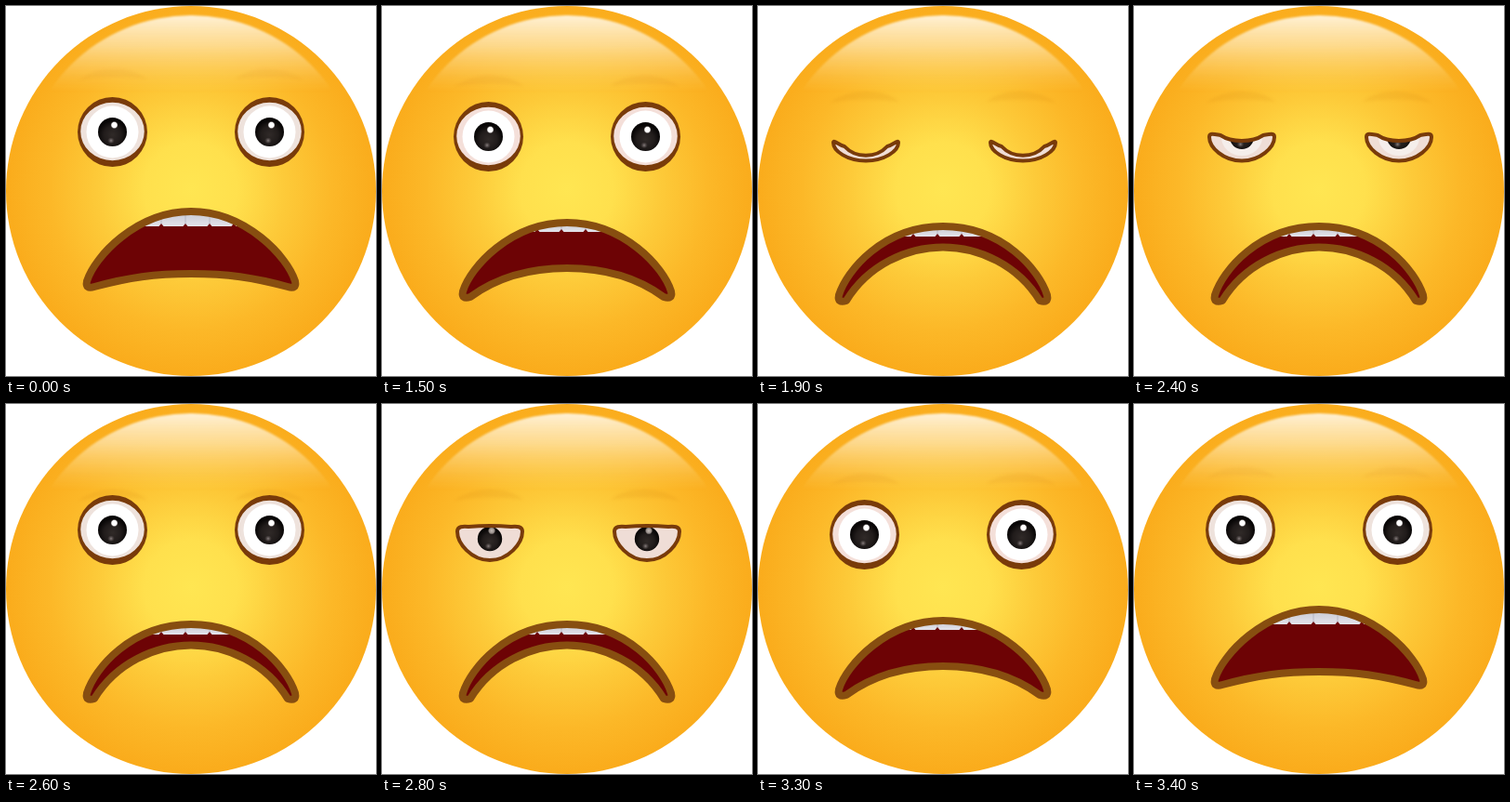
An HTML page with a canvas that plays this animation: 398x398 px, repeating every 3.5 s.

```html
<!DOCTYPE html>
<html lang="en">
<head>
<meta charset="utf-8">
<title>Weary face</title>
<style>
html, body { margin: 0; width: 100%; height: 100%; overflow: hidden; background: #fff; }
canvas { display: block; width: 398px; height: 398px; }
</style>
</head>
<body>
<canvas id="stage" width="398" height="398"></canvas>
<script>
const g = document.getElementById('stage').getContext('2d');
const LOOP = 3500;

// Round eyes have a centre; lidded eyes have corner k, lift h, shoulder u, lid m, side l, bottom b.
const EYES = {
  open: { y: 135.5, ring: '#eee2dc', pupil: 15.5 },
  low: { y: 140.5, ring: '#f4dfd9', pupil: 15.5 },
  drop: { k: 143, h: 13, u: 121, m: 117, l: 162, b: 174, py: 143, pupil: 14.5 },
  half: { k: 137, h: 5, u: 132, m: 131, l: 150, b: 168, py: 145, pupil: 13.2 },
  narrow: { k: 141, h: 5, u: 139, m: 147, l: 152, b: 166.5, py: 141, pupil: 13 },
  shut: { k: 147, h: 4, u: 151, m: 164, l: 156, b: 166.5, py: 141, pupil: 13 }
};

// Mouth: top, corner, bottom, upper and lower lip handles, teeth edge, brow offset and strength.
const MOUTHS = [
  { top: 221, corner: 296, low: 288, ux: 140, hx: 132, hy: 292, teeth: 237, brow: 0, ink: .06 },
  { top: 233, corner: 307, low: 282, ux: 138, hx: 125, hy: 291, teeth: 243, brow: 7, ink: .08 },
  { top: 236, corner: 310, low: 268, ux: 136, hx: 121, hy: 283, teeth: 247, brow: 17, ink: .09 },
  { top: 237, corner: 311, low: 259.5, ux: 134, hx: 118, hy: 279, teeth: 248, brow: 24, ink: .1 }
];

const POSES = [
  [0, 'open', 0], [1500, 'low', 1], [1600, 'drop', 2], [1700, 'half', 3],
  [1800, 'narrow', 3], [1900, 'shut', 3], [2400, 'narrow', 3], [2500, 'half', 3],
  [2600, 'open', 3], [2800, 'half', 3], [2900, 'narrow', 3], [3100, 'half', 3],
  [3200, 'drop', 2], [3300, 'low', 1], [3400, 'open', 0]
];

function radial(x, y, r, stops) {
  const paint = g.createRadialGradient(x, y, 0, x, y, r);
  stops.forEach(([at, color]) => paint.addColorStop(at, color));
  return paint;
}

function oval(x, y, rx, ry, fill) {
  g.beginPath();
  g.ellipse(x, y, rx, ry, 0, 0, Math.PI * 2);
  g.fillStyle = fill;
  g.fill();
}

function outline(path, color, width) {
  g.strokeStyle = color;
  g.lineWidth = width;
  g.lineJoin = g.lineCap = 'round';
  g.stroke(path);
}

function drawFace() {
  oval(199, 199, 199, 199, radial(199, 197, 202, [
    [0, '#ffe652'], [.25, '#ffe04d'], [.5, '#fdca39'], [.75, '#fcb828'], [1, '#faab1b']
  ]));
  const shine = g.createLinearGradient(0, 10, 0, 92);
  shine.addColorStop(0, 'rgba(255,250,238,.88)');
  shine.addColorStop(.4, 'rgba(255,244,215,.58)');
  shine.addColorStop(.8, 'rgba(255,238,180,.16)');
  shine.addColorStop(1, 'rgba(255,235,160,0)');
  g.filter = 'blur(1.2px)';
  oval(199, 193, 183, 183, shine);
  g.filter = 'none';
}

function drawBrows({ brow, ink }) {
  g.filter = 'blur(1.5px)';
  for (const side of [-1, 1]) {
    g.save();
    g.translate(199 + side * 84, 73 + brow);
    g.scale(side, 1);
    g.fillStyle = `rgba(190,105,0,${ink})`;
    g.fill(new Path2D('M-37,6 C-18,-9 16,-9 37,7 C14,2 -18,3 -37,6Z'));
    g.restore();
  }
  g.filter = 'none';
}

function drawPupil(y, r, bright) {
  const glint = y - r * (bright ? .48 : .66);
  oval(0, y, r, r, radial(0, y + r * .2, r, [[0, '#302a28'], [.6, '#211c1b'], [1, '#080606']]));
  oval(-1.5, y + r * .6, 4, 3, radial(-1.5, y + r * .6, 4, [
    [0, 'rgba(170,160,160,.75)'], [1, 'rgba(90,80,80,0)']
  ]));
  oval(2, glint, 4, 4.2, radial(2, glint, 4.2, [
    [0, bright ? '#fff' : '#c4bcb8'], [.65, bright ? '#fff' : '#948b87'], [1, 'rgba(150,140,140,0)']
  ]));
}

function drawEye(x, eye) {
  g.save();
  if (eye.y) {
    g.translate(x, eye.y);
    oval(0, 0, 37.5, 37.5, '#793b0a');
    oval(0, -.5, 34.3, 31.2, eye.ring);
    oval(0, 0, 28, 28, '#fff');
    drawPupil(0, eye.pupil, true);
  } else {
    const { k, h, u, m, l, b } = eye;
    g.translate(x + 1.5, 0);
    const shape = new Path2D(`M-35,${k} C-35,${k - h} -29,${u - 1} -23,${u}
      C-11,${m} 11,${m} 23,${u} C29,${u - 1} 35,${k - h} 35,${k}
      C35,${l} 20,${b} 0,${b} S-35,${l} -35,${k}Z`);
    g.save();
    g.clip(shape);
    g.fillStyle = '#efddd6';
    g.fillRect(-40, 90, 80, 90);
    if (eye === EYES.narrow) oval(0, 141, 22, 20, '#f5eeeb');
    drawPupil(eye.py, eye.pupil, eye === EYES.drop);
    g.restore();
    outline(shape, '#793b0a', 4);
  }
  g.restore();
}

function drawMouth({ top, corner, low, ux, hx, hy, teeth }) {
  const shape = new Path2D(`M87,${corner} C95,${corner - 26} ${ux},${top} 199,${top}
    S303,${corner - 26} 311,${corner} Q313,${corner + 9} 303,${corner + 6}
    C${398 - hx},${hy} 238,${low} 199,${low} S${hx},${hy} 95,${corner + 6}
    Q85,${corner + 9} 87,${corner}Z`.replace('S303', `C${398 - ux},${top} 303`));
  g.save();
  g.clip(shape);
  g.fillStyle = '#6d0305';
  g.fillRect(80, 210, 240, 120);
  const enamel = g.createLinearGradient(0, top, 0, teeth);
  enamel.addColorStop(0, '#c5c5ce');
  enamel.addColorStop(1, '#e4e4ec');
  g.fillStyle = enamel;
  g.fillRect(141, top, 116, teeth - top);
  for (let x = 167; x <= 245; x += 26) {
    g.fillStyle = 'rgba(140,140,160,.4)';
    g.fillRect(x - .5, top, 1, teeth - top);
    g.fillStyle = '#6d0305';
    g.fill(new Path2D(`M${x - 2.5},${teeth} L${x},${teeth - 3} L${x + 2.5},${teeth}Z`));
  }
  g.restore();
  outline(shape, '#874e10', 8);
}

function draw(now) {
  const time = now % LOOP;
  const [, eye, mouth] = POSES.findLast(([start]) => start <= time);
  g.clearRect(0, 0, 398, 398);
  drawFace();
  drawBrows(MOUTHS[mouth]);
  drawEye(114.5, EYES[eye]);
  drawEye(283.5, EYES[eye]);
  drawMouth(MOUTHS[mouth]);
}

const begin = performance.now();
function tick() {
  draw(performance.now() - begin);
  requestAnimationFrame(tick);
}
tick();
</script>
</body>
</html>
```
